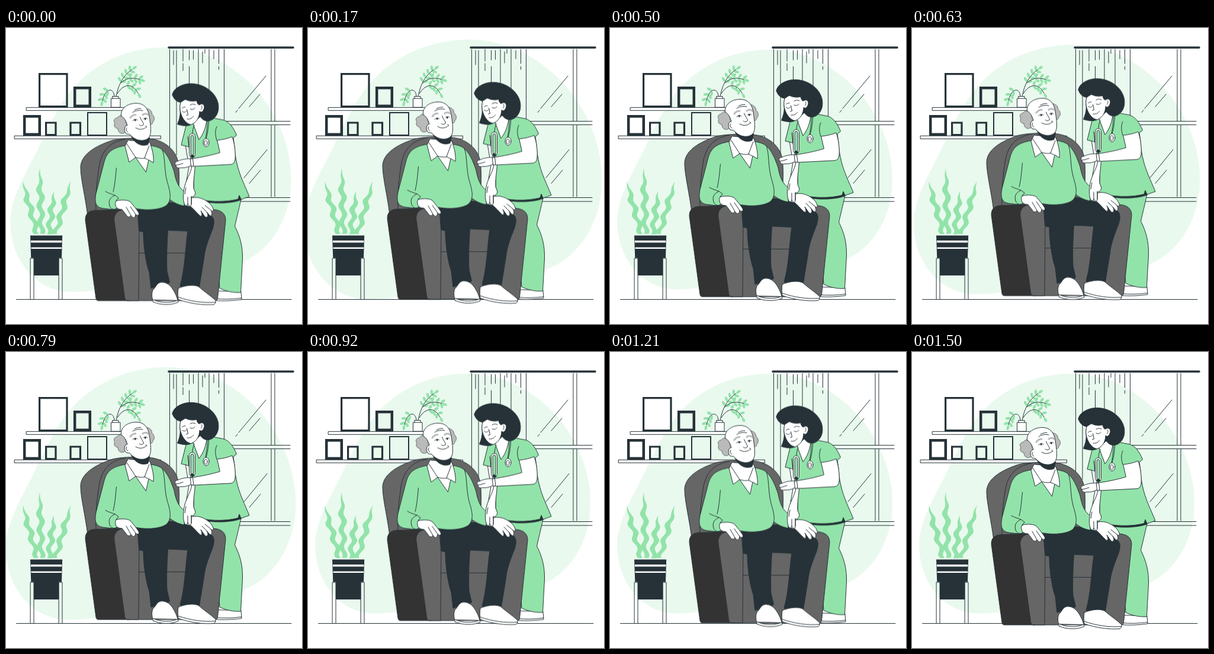
These frames come from a looping animation (500 by 500 pixels, 1.54 s). An HTML page:

```html
<!DOCTYPE html>
<html lang="en">
<head>
<meta charset="utf-8">
<title>Care visit</title>
<style>
html, body { margin: 0; width: 100%; height: 100%; overflow: hidden; background: #fff; }
svg { display: block; width: 100vw; height: 100vh; }
.ln { fill: none; }
.w { fill: #fff; }
.g { fill: #92e3a9; }
.d { fill: #263238; }
.c { fill: #666; }
.n { stroke: none; }
#blob { transform-origin: 244.5px 239px; }
</style>
</head>
<body>
<svg viewBox="0 0 500 500" stroke="#263238" stroke-width="1" stroke-linecap="round" stroke-linejoin="round">
  <path id="blob" class="n" fill="#e9f9ee" d="M270 36.5C380 36 477 140 477 255C477 320 443 373 395 393C330 418 240 424 190 432C160 438 140 442 110 441.5C55 440 12 390 12 325C12 285 41 240 60 200C85 148 102 114 136 84C173 54 215 37 270 36.5Z"/>

  <g id="window" class="ln">
    <path d="M276.500 36V250M288 38V215M309.500 65V100M325 36V100M343 36V105M368.500 36V155"/>
    <path d="M283 38V62M299 36V56M299 60V72M309.500 38V54M316.500 38V53M332 40V59M336 36V43M351 38V52M359.500 36V60M359.500 65V70"/>
    <path d="M448 36V157M454 36V157M448 163.500V285M454 163.500V285M362 157.500H480M362 163.500H480M390 286.500H480M390 293H480"/>
    <path d="M439 81L393 136M391 139L388 142.500M429 112L411 133M441 205.500L402 253M430 240L411 262.500"/>
    <path d="M275 33H485" stroke-width="3.600"/>
  </g>

  <g id="shelves" class="ln" stroke-linejoin="miter">
    <path class="w" d="M34.500 134.300H215V139.300H34.500ZM14.500 182.200H261.500V187.200H14.500Z"/>
    <path stroke-width="2" d="M138 143H170V181H138Z"/>
    <path stroke-width="3.200" d="M56.600 77.600H103V132.500H56.600ZM67.600 160H84V180.500H67.600ZM109 160H125.500V180.500H109Z"/>
    <path stroke-width="4.500" d="M116.200 101.200H141.800V131.800H116.200ZM31.200 149.200H56.800V179.800H31.200Z"/>
  </g>

  <g id="sprig">
    <path class="ln" d="M186 116C189 100 195 82 213 70M183 116C183 101 168 99 163 123M188 111C199 93 214 93 223 110M194 93C203 84 214 83 226 87"/>
    <path class="w" d="M180 115.500H190V119H193V134H177.500V119H180ZM180 119H190"/>
  </g>

  <g id="plant">
    <path class="ln" d="M41.500 389H47V458.500H41.500ZM89.500 389H95V458.500H89.500Z"/>
    <path class="d n" d="M41 350.500H95.200L94 388.500H89.300V418H47V388.500H42.300Z"/>
    <path class="w n" d="M42 359H94.300V362.500H42ZM42.500 370.500H94V373H42.500Z"/>
  </g>
  <path d="M17.500 458.500H482"/>

  <g id="people">
    <!-- nurse: legs, body, head -->
    <path class="w" d="M357 445C354 452 353 456 353 460.500C366 462 384 461 398 459L397 446ZM353.500 457.500C368 459 384 458.500 398 456.500"/>
    <path class="g" d="M340 288L397 290C393 308 390 320 386.500 335C396 354 400 370 399.500 392L396.500 447C384 448 372 445 361 440L352 320Z"/>
    <path class="w" d="M303 195L319 190L323 225L319 272L301 280L309 235Z"/>
    <path class="g" d="M304 166L296 198L309 201C312 225 320 245 316 286C336 295 370 295 392 290L394 283L397 290L411 285C400 258 388 238 386 200L384 186L389.500 181.500C384 168 377 159 368 156L350 152.500Z"/>
    <path class="d n" d="M316 287C340 295 370 295 392 289L394 283L398 291C375 299 340 298 316 290Z"/>
    <path class="ln" d="M356 190C353 181 353 173 356 167M307 184L309 201"/>
    <path class="w" d="M316 162L326 189C333 180 337 170 339 157L331 148Z"/>
    <path class="d" d="M281 113C283 101 301 93 316 94.500C338 96 356 112 358.500 129C361 145 352 156 342 157.500C335 158 331 154 328 150L312 164C304 167 296 165 289.500 163C293 155 295 147 294 139C294 134 294 130 295 126C288 125 283 120 281 113Z"/>
    <path class="w" d="M295 126C298 124 301 122 303 121C309 124 316 125 322 123C323 128 325 131 327 130C333 126 337 132 334 138C332 143 329 143 327 141C327 151 322 160 313 163.500C307 163 303 159 299 153C295 146 292 136 295 126Z"/>
    <path class="ln" d="M297.500 136C299 134 301 133.500 303 134M311 130.500C314 128.500 317 128.500 320 130M297.500 141C300 143.500 303 143 305 140.500M311 137C314 139 317 138 319 135.500M305.500 138L307.500 147L304.500 148M306 154C310 155 314 153 316.500 149.500M330 131.500C332 133 331 136 329.500 138"/>

    <!-- chair -->
    <path class="c" d="M138 318C134 285 126 255 126 235C127 214 150 200 180 190C200 185.500 226 186 248 188C273 193 288 210 291 228C294 250 292 285 288 320Z"/>
    <path class="ln" d="M202 188C176 192 163 207 158 230C153 260 151 285 152 308"/>
    <path class="c" d="M222 335L318 318C326 308 338 306.500 350 307C364 308 371 314 371 325L357.500 457Q357 461 353 461H204L222 400Z"/>
    <path class="ln" d="M224 380.500H302"/>
    <path fill="#333" d="M134 324C134 312 142 308.500 153 308.500L201 307C188 309 182 316 183 327L202 455Q203 461 208 461H156Q152.500 461 152 457Z"/>
    <path class="c" d="M183 327C181 315 189 307 201 307C216 307 225 314 225 326L224 461H206Q201 461 200.500 456Z"/>

    <!-- older man: trousers, shoes, sweater -->
    <path class="d" d="M222 304L275 295C300 296 330 309 346 317C353 322 352 330 349 340C342 358 336 372 334 392L326 441C320 443 316 436 308 437C302 438 298 439 294 436C302 410 303 370 307 343.500L273.500 342C272 365 271 390 272 411L276.500 430C272 434 268 434 263 433C256 434 252 439 245 440L242 413C237 400 232 370 232 345L225 343.500Z"/>
    <path class="w" d="M248.500 463C246 455 246 448 248 443C253 439 254 432 261 430C270 429 277 434 282 442C287 450 289 456 291 463.500C279 469 262 469 248.500 463ZM248 459C262 465.500 279 465.500 290.500 460"/>
    <path class="w" d="M291 440C290 448 290 453 291 459C311 466 333 469 351 467.500C354 466 355 462 353.500 460C345 452 335 446 325 437C314 433 301 436 291 440ZM291 455C311 462 334 465.500 354 463.500"/>
    <path class="g" d="M258 203C270 207 278 225 284 243C287 260 292 271 302 277L301 301C289 299 279 293 272 286Z"/>
    <path class="g" d="M201 199C180 203 171 209 166 226L152 280C149 296 152 303 163 305L180 307C196 304 211 304 223 306C240 309 262 307 271 300C282 290 276 273 272 259C267 240 269 218 264 206C259 202 252 200 245 199Z"/>
    <path class="ln" d="M186.500 237C185 252 184 266 181 277M168 276.500C174 280 180 281 184 283"/>
    <path class="g" d="M184 283C177 286 173 291 174.500 298C175 304 179 307 184 306.500L190 303C184 297 184 292 190 288Z"/>
    <path class="w" d="M187 292C197 290 206 291 210 294C216 301 220 306 224 312C226 317 222 318 219 315L218 319C216 322 213 320 211 317C209 321 205 320 203 316L196 307C190 307 185 304 185 299C184 296 185 293 187 292ZM203 303L211 317M210 302L219 315"/>
    <path class="w" d="M206 190L201 200L208 227L219 219L236.500 244L241 223L249 228C250 216 247 205 243 194Z"/>
    <path class="ln" d="M219 219L204 196M219 219C226 221 232 221 234 220L240 223M234 220L242 199"/>
    <path class="d" d="M211 182C216 194 228 202 240 197L242.500 186Z"/>

    <!-- his head -->
    <path fill="#bababa" stroke-width=".6" d="M199 146C194 148 190 149 188 152C182 153 181 158 184 161C181 165 184 170 189 170C189 176 193 180 199 178L205 174ZM236 136C242 137 247 140 246.500 146C251 149 252 156 248 159C248 163 244 165 241 163Z"/>
    <path class="w" d="M194.500 149C193 137 204 128 219 127.500C233 127 240 136 242 149C244 164 247 179 241 186C232 194 217 190 209 180L203 179C198 174 200 165 205 165C203 157 199 151 194.500 149Z"/>
    <path class="ln" d="M204 169C202 172 203 175 206 176M214 143C218 140 225 138.500 231 140M217 139C221 137 224 136 228 136.500M226.500 151C228 156 232 160 232.500 163C231 166 227 166 225 164M219 169C225 173 233 172 237 167.500M236 165.500L238 168M214 157C217 154 220 154 222 156M232 154C234 152 237 152 239 153.500"/>
    <path class="ln" stroke="#bababa" stroke-width="3" d="M210 152C212 149 215 147 219 147M231 147C234 144.500 238 145 240 147"/>
    <path class="d n" d="M217 154.500h2.500v3h-2.500ZM234 152.500h2.500v3h-2.500Z"/>

    <!-- joined hands -->
    <path class="w" d="M311 288C320 285 329 287 336 291C343 295 348 300 350 306C351 310 348 311 346 308C349 314 348 319 344 317L339 311C343 318 340 322 336 319L329 309C333 317 330 320 327 317C321 311 317 306 311 301ZM336 300L346 308M331 303L339 311"/>
    <path class="w" d="M314 234C312 247 303 257 300.500 274C299 283 299 293 302 299C304 302 307 300 307 297C308 302 313 303 313 298L313 285C315 287 319 284 320 279L317 271C316 258 319 246 319.500 233Z"/>
    <path class="ln" d="M307 297V286M313 298C314 293 313 288 313 285M304 270L302 281"/>

    <!-- stethoscope and forearm -->
    <path class="ln" d="M343 153C342 168 341 177 338 187M340.500 154C340 168 339 178 337 187M318 164C316 170 315 174 315 179"/>
    <ellipse class="w" cx="338" cy="194" rx="5" ry="7"/>
    <ellipse class="ln" cx="337.500" cy="194.500" rx="2.600" ry="4"/>
    <rect class="w" x="309.500" y="178.500" width="10" height="40" rx="5"/>
    <rect class="g" x="312" y="181.500" width="5" height="34" rx="2.500"/>
    <path class="w" d="M357 190C366 189 375 187 382 184C386 195 388 210 387 222C386 229 383 231 377 231L318 234L312 233C306 236 300 237 295 236.500C290 238 287 235 287 232C284 230 286 226 290 225.500C297 222 305 221 314 221C330 219 348 215 361 211Z"/>
    <path class="ln" d="M287 232C291 232 295 230 299 229"/>
    <path class="w" d="M311.500 221.500L315.500 221L317 233.500L313 234Z"/>
    <path class="d n" d="M311 216L315 214L319 217L315 220.500Z"/>
  </g>
</svg>
<script>
const $ = id => document.getElementById(id);

function add(parent, tag, attrs) {
  const el = document.createElementNS('http://www.w3.org/2000/svg', tag);
  for (const k in attrs) el.setAttribute(k, attrs[k]);
  parent.prepend(el);
  return el;
}

// Leaf pairs along the outer half of each twig
const twigs = $('sprig').firstElementChild.getAttribute('d').split(/(?=M)/);
for (const d of twigs) {
  const twig = add($('sprig'), 'path', { d, class: 'ln n' });
  const len = twig.getTotalLength();
  const leaf = (s, turn) => {
    const p = twig.getPointAtLength(s), q = twig.getPointAtLength(s - 1);
    const angle = Math.atan2(p.y - q.y, p.x - q.x) * 180 / Math.PI + turn;
    add($('sprig'), 'ellipse', {
      class: 'g n', cx: 5, rx: 4.2, ry: 2.2, transform: `translate(${p.x} ${p.y}) rotate(${angle})`
    });
  };
  for (let s = len * 0.48; s < len - 1; s += 8) {
    leaf(s, -55);
    leaf(s, 55);
  }
  leaf(len, 0);
}

// Wavy upright leaf from tip to base
function blade(tipX, tipY, baseX, waves) {
  const left = [], right = [], baseY = 350;
  for (let t = 0; t <= 1; t += 1 / 48) {
    const grow = Math.min(1, t * 3);
    const x = tipX + (baseX - tipX) * t - 2.8 * grow * Math.sin(t * waves * 2 * Math.PI);
    const y = tipY + (baseY - tipY) * t;
    const half = 5.2 * grow * (1 - 0.25 * t);
    left.push([x - half, y]);
    right.unshift([x + half, y]);
  }
  add($('plant'), 'polygon', { class: 'g n', points: left.concat(right).join(' ') });
}
blade(57, 237, 60, 4);
blade(28.5, 259, 53, 3.5);
blade(81, 276, 72, 3);
blade(109.5, 259, 83, 3.5);

// Motion, sampled from rules every STEP ms
const LOOP = 1540, STEP = 10, LEAD = 29;

// Straight rise from a to peak, straight fall to b
const ramp = (t, a, peak, b) =>
  Math.max(0, Math.min((t - a) / (peak - a), (b - t) / (b - peak)));
const beat = t => 1 + 0.1 * (ramp(t, 0, 150, 450) + ramp(t, 600, 750, 900));
const lift = t => -10 * ramp(t, 0, 750, 1500);

function play(id, css) {
  const keys = Array.from({ length: LOOP / STEP + 1 }, (_, i) => ({ transform: css(i * STEP) }));
  $(id).animate(keys, { duration: LOOP, delay: -LEAD, iterations: Infinity });
}
play('blob', t => `scale(${beat(t)})`);
play('people', t => `translateY(${lift(t)}px)`);
</script>
</body>
</html>
```
